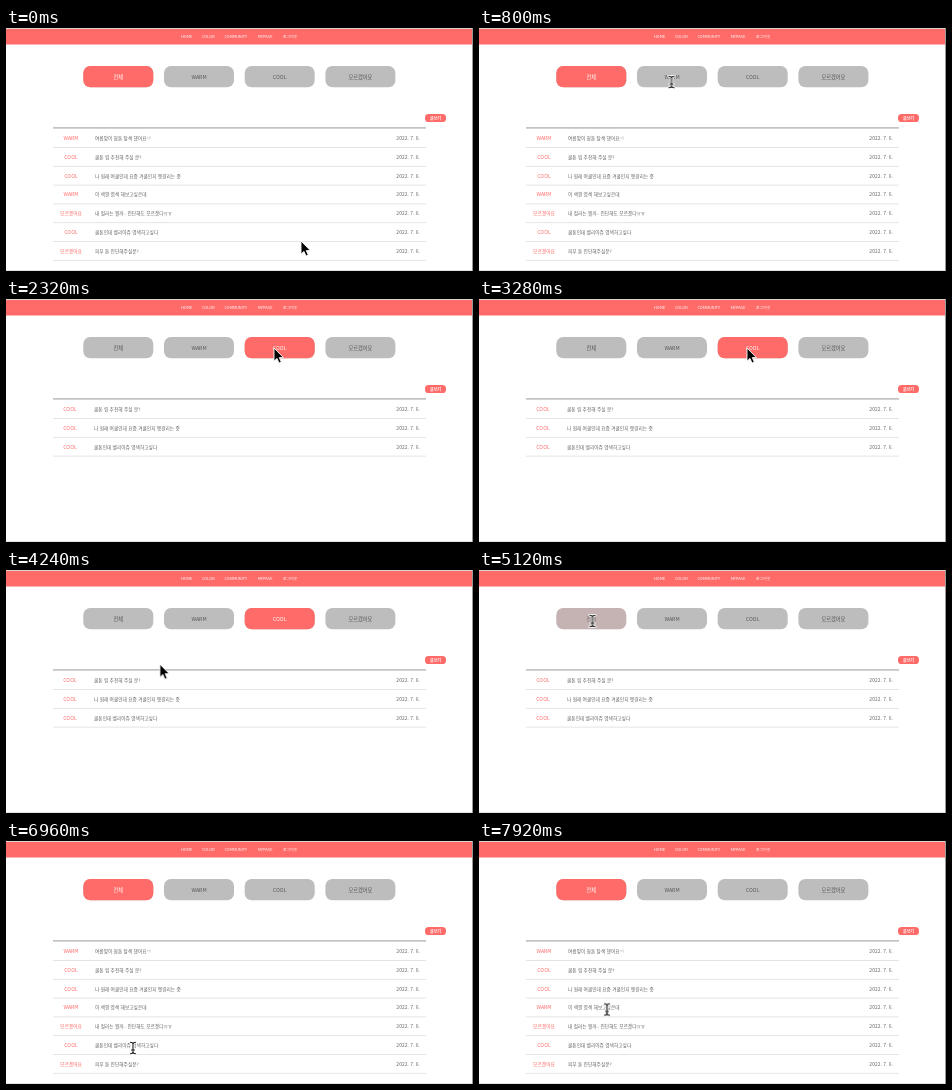
Write an HTML page that moves like this. It is 467 px wide and 243 px high and loops after 8000 ms.

```html
<!DOCTYPE html>
<html lang="ko">
<head>
<meta charset="utf-8">
<title>Community</title>
<style>
html, body { margin: 0; width: 100%; height: 100%; overflow: hidden; background: #fff; }
svg { display: block; width: 467px; height: 243px; }
text { font-family: "Noto Sans CJK KR", "Noto Sans KR", "Noto Sans CJK JP", sans-serif; }
.mid { text-anchor: middle; }
.end { text-anchor: end; }
.nav { font-size: 3.9px; font-weight: 500; fill: #fff; }
.write { font-size: 4px; font-weight: 700; fill: #fff; }
.label { font-size: 5.2px; fill: #555; }
.on .label { fill: #fff; }
.tag { font-size: 4.75px; font-weight: 300; fill: #ff6b68; }
.latin { font-size: 5.1px; }
.title { font-size: 4.72px; fill: #666; }
.date { font-size: 5px; fill: #666; }
.anim { animation: 8s linear infinite; }

.on-all { animation-name: on-all; }
.on-warm { animation-name: on-warm; }
.on-cool { animation-name: on-cool; }
.on-unsure { display: none; }
@keyframes on-all { 0%, 13% { opacity: 1; } 15%, 63% { opacity: 0; } 64% { opacity: .12; } 66%, 100% { opacity: 1; } }
@keyframes on-warm { 0%, 13% { opacity: 0; } 15%, 27% { opacity: 1; } 29%, 100% { opacity: 0; } }
@keyframes on-cool { 0%, 27% { opacity: 0; } 29%, 62% { opacity: 1; } 64%, 100% { opacity: 0; } }

.list { animation-timing-function: step-end; }
.list-all { animation-name: list-all; }
.list-warm { animation-name: list-warm; }
.list-cool { animation-name: list-cool; }
@keyframes list-all { 0% { opacity: 1; } 14% { opacity: 0; } 65%, 100% { opacity: 1; } }
@keyframes list-warm { 0% { opacity: 0; } 14% { opacity: 1; } 28%, 100% { opacity: 0; } }
@keyframes list-cool { 0% { opacity: 0; } 28% { opacity: 1; } 65%, 100% { opacity: 0; } }

.cursor { animation-name: move; animation-timing-function: ease-in-out; }
@keyframes move {
  0%, 1% { transform: translate(295px, 213px); }
  9.5%, 18% { transform: translate(192.5px, 54px); }
  23% { transform: translate(262px, 48.5px); }
  27%, 45% { transform: translate(268px, 49px); }
  50% { transform: translate(215px, 115px); }
  55% { transform: translate(124px, 84px); }
  59%, 66.5% { transform: translate(113.5px, 51px); }
  73%, 80% { transform: translate(126px, 209.5px); }
  87% { transform: translate(127px, 207px); }
  95%, 100% { transform: translate(128px, 168.5px); }
}
.beam { animation-name: beam; animation-timing-function: step-end; }
.arrow { animation-name: arrow; animation-timing-function: step-end; }
@keyframes beam { 0% { opacity: 0; } 9% { opacity: 1; } 19% { opacity: 0; } 58% { opacity: 1; } 67% { opacity: 0; } 72%, 100% { opacity: 1; } }
@keyframes arrow { 0% { opacity: 1; } 9% { opacity: 0; } 19% { opacity: 1; } 58% { opacity: 0; } 67% { opacity: 1; } 72%, 100% { opacity: 0; } }
</style>
</head>
<body>
<svg viewBox="0 0 467 243">
  <rect width="467" height="243" fill="#fff"/>
  <rect width="467" height="16.5" fill="#ff6b68"/>
  <rect width="467" height="1" fill="#dcd2d2"/>
  <rect y="242" width="467" height="1" fill="#e2e2e2"/>
  <rect x="466" width="1" height="243" fill="#999"/>
  <g id="page"></g>
  <rect x="419" y="86" width="21" height="8" rx="3.6" fill="#ff6b68"/>
  <text class="write mid" x="429.5" y="91.6">글쓰기</text>
  <rect x="47" y="99.2" width="373" height="1.4" fill="#b9b5b5"/>
  <g class="cursor anim">
    <path class="arrow anim" d="M0 0V13.2L3 10.4L5 15.1L7.3 14.1L5.3 9.6H9.4Z" fill="#000" stroke="#fff" stroke-width=".9"/>
    <g class="beam anim" fill="none" stroke-linecap="round">
      <path id="bar" d="M-2.6 -5.8Q0 -5.6 0 -4V4Q0 5.6 -2.6 5.8M2.6 -5.8Q0 -5.6 0 -4V4Q0 5.6 2.6 5.8M-1.5 2H1.5" stroke="#fff" stroke-width="2.4"/>
      <use href="#bar" style="stroke:#222"/>
      <path d="M-2.6 -5.8Q0 -5.6 0 -4V4Q0 5.6 -2.6 5.8M2.6 -5.8Q0 -5.6 0 -4V4Q0 5.6 2.6 5.8M-1.5 2H1.5" stroke="#222" stroke-width="1.1"/>
    </g>
  </g>
</svg>
<script>
const menu = [['HOME', 175], ['COLOR', 196], ['COMMUNITY', 218.5], ['MYPAGE', 251.7], ['로그아웃', 277]];
const tabs = [['all', '전체'], ['warm', 'WARM'], ['cool', 'COOL'], ['unsure', '모르겠어요']];
const posts = [
  ['WARM', '여름맞이 웜톤 탈색 했어요~!'],
  ['COOL', '쿨톤 립 추천해 주실 분?'],
  ['COOL', '나 원래 여쿨인데 요즘 겨쿨인지 헷갈리는 중'],
  ['WARM', '이 색깔 염색 해보고싶은데'],
  ['모르겠어요', '내 컬러는 뭘까.. 진단해도 모르겠다ㅠㅠ'],
  ['COOL', '쿨톤인데 벨리아쥬 염색하고싶다'],
  ['모르겠어요', '피부 톤 진단해주실분?']
];

const text = (cls, x, y, s) => `<text class="${cls}" x="${x}" y="${y}">${s}</text>`;

const button = (i, label, fill) =>
  `<rect x="${77.3 + i * 80.7}" y="38" width="70" height="21.3" rx="7" fill="${fill}"/>` +
  text('label mid', 112.3 + i * 80.7, 50.6, label);

function row([tag, title], i, x) {
  const y = 112 + i * 18.8;
  const latin = /[A-Z]/.test(tag) ? ' latin' : '';
  return text('tag mid' + latin, x - 24, y, tag) + text('title', x, y, title) +
    text('date end', 414, y, '2022. 7. 6.') +
    `<rect x="47" y="${y + 7.1}" width="373" height=".8" fill="#dedede"/>`;
}

const list = (name, items, x) =>
  `<g class="list list-${name} anim">${items.map((p, i) => row(p, i, x)).join('')}</g>`;
const tagged = tag => posts.filter(p => p[0] === tag);

document.getElementById('page').innerHTML =
  menu.map(([s, x]) => text('nav', x, 10.2, s)).join('') +
  tabs.map(([name, label], i) => button(i, label, '#bdbdbd') +
    `<g class="on on-${name} anim">${button(i, label, '#ff6b68')}</g>`).join('') +
  list('all', posts, 89) + list('warm', tagged('WARM'), 89) + list('cool', tagged('COOL'), 88);
</script>
</body>
</html>
```
